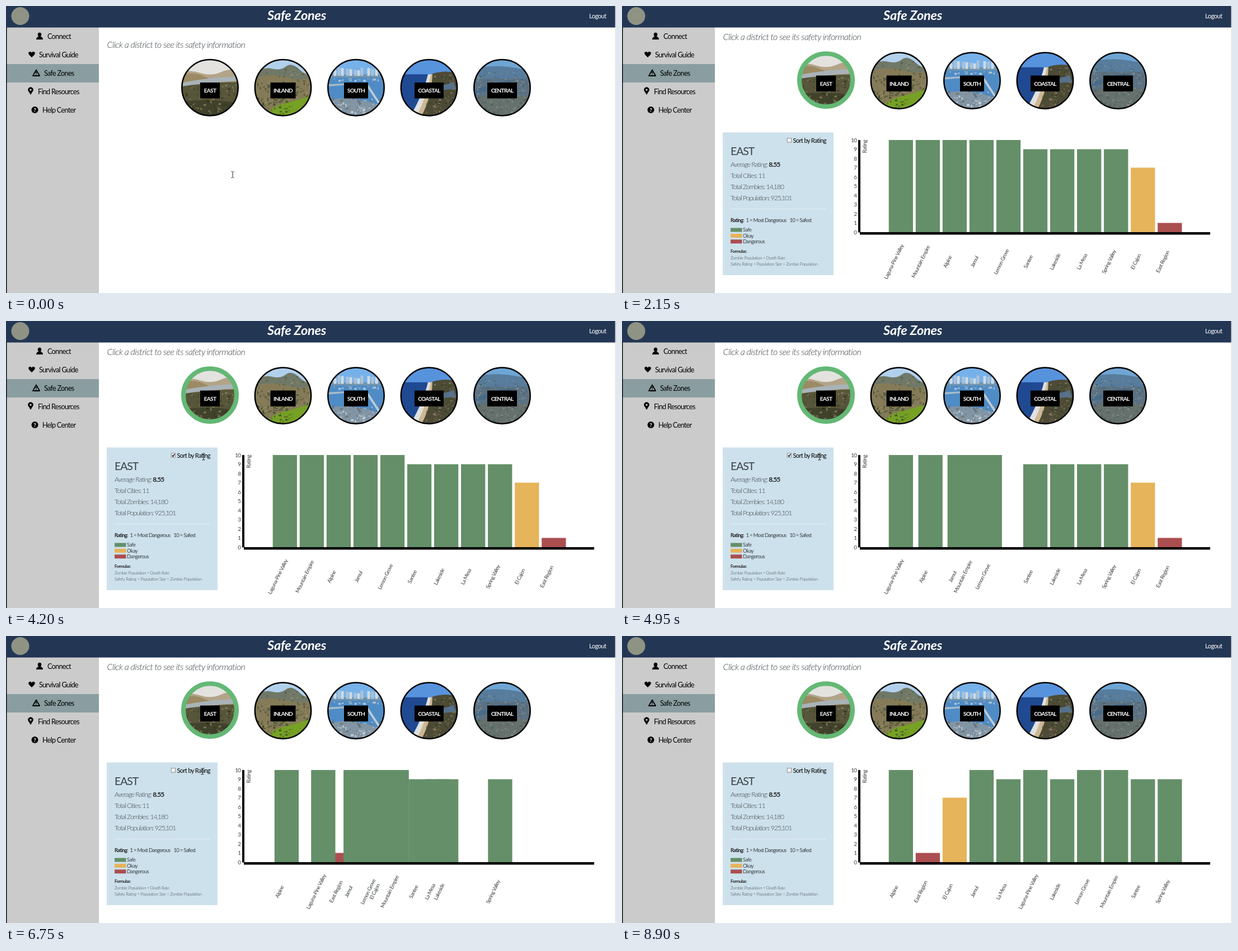
These frames come from a looping animation (1090 px wide and 514 px high, 9750 ms). An HTML page:

```html
<!DOCTYPE html>
<html lang="en">
<head>
<meta charset="utf-8">
<title>Safe Zones</title>
<style>
html, body { margin: 0; width: 100%; height: 100%; overflow: hidden; background: #fff; }
svg { display: block; width: 1090px; height: 514px; }
text { font-family: Lato, "Open Sans", sans-serif; letter-spacing: -.055em; fill: #3a4045; white-space: pre; }
.bold { font-weight: 700; fill: #222; }
.thin { font-weight: 300; letter-spacing: -.04em; }
.wide { letter-spacing: -.01em; }
.tight { letter-spacing: -.08em; }
.dark { fill: #000; }
.light { fill: #fff; }
.mid { text-anchor: middle; }
.end { text-anchor: end; }
</style>
</head>
<body>
<svg id="stage" viewBox="0 0 1090 514"></svg>
<script>
const LOOP = 9750, CLICK = 1950, LOADED = 2000, SCROLL = 14;
const CHECK_ON = 4200, CHECK_OFF = 6050;
const GREEN = '#648f68', AMBER = '#e6b45a', RED = '#ab4e50';

const text = (x, y, size, str, cls = '', more = '') =>
  `<text x="${x}" y="${y}" font-size="${size}" class="${cls}" ${more}>${str}</text>`;
const rect = (x, y, w, h, fill, more = '') =>
  `<rect x="${x}" y="${y}" width="${w}" height="${h}" fill="${fill}" ${more}/>`;
const path = (d, fill, more = '') => `<path d="${d}" fill="${fill}" ${more}/>`;

let seed = 7;
const rand = () => (seed = seed * 16807 % 2147483647) / 2147483647;

// Small random blocks that stand for houses, trees and boats
function scatter(n, x, y, w, h, colors) {
  let out = '';
  for (let i = 0; i < n; i++) {
    const c = colors[Math.floor(rand() * colors.length)];
    out += rect((x + rand() * w).toFixed(1), (y + rand() * h).toFixed(1),
      (1 + rand() * 4).toFixed(1), (1 + rand() * 2.5).toFixed(1), c);
  }
  return `<g opacity=".75">${out}</g>`;
}
const ground = fill => rect(-52, -52, 104, 104, fill);

// Circle pictures, drawn around their centre
const scenes = {
  EAST: ground('#e3e2df') +
    path('M-52-28Q-34-32-16-26T20-28T52-30V10H-52Z', '#b3a488') +
    path('M-52-22Q-30-30-8-19T52-20V12H-52Z', '#9c8a64') +
    path('M-52-8Q-10-18 52-20V-12Q0-10-52 0Z', '#a9b3b8') +
    path('M-52-2Q0-10 52-10V52H-52Z', '#57553a') +
    path('M-52 26Q0 18 52 28V52H-52Z', '#41422b') +
    scatter(130, -52, -6, 104, 58, ['#33391f', '#3f4526', '#7d7550', '#8d8364', '#2c3019']),
  INLAND: ground('#b2d0ec') +
    path('M-52-26Q-35-38-20-34T5-38T30-32T52-28V52H-52Z', '#707868') +
    path('M-52-18Q-20-26 10-18T52-20V52H-52Z', '#857b58') +
    scatter(110, -52, -34, 104, 62, ['#48553a', '#59603f', '#9a8e68', '#3a482c']) +
    path('M-30 52Q-22 34 0 29T52 14V52Z', '#76a124') +
    scatter(50, -52, 18, 58, 30, ['#314023', '#3d4b2a', '#55642f']) +
    scatter(14, 0, 30, 45, 16, ['#5b8420']),
  SOUTH: ground('#76b1ea') +
    path('M-52-24H52V-14H-52Z', '#6f93ad') +
    [-40, -33, -27, -18, -12, -4, 2, 8, 20, 27, 34].map((x, i) =>
      rect(x, -31 - i * 5 % 6, 5, 10 + i * 5 % 6, i % 2 ? '#a9c2d6' : '#cbdbe6')).join('') +
    path('M-52-18H52V52H-52Z', '#4f8cc6') +
    scatter(26, -48, -18, 96, 5, ['#d4dfe6', '#8fa9ba']) +
    path('M-52-6L10-9L10-7L-52-2Z', '#a5bccb') +
    path('M22-5L46 32L43 34L18-4Z', '#bfccd4') +
    path('M-52 22Q0 12 52 36V52H-52Z', '#8195a5') +
    scatter(110, -52, 17, 104, 35, ['#dde2e6', '#5d6b77', '#b5bfc6', '#716a62']),
  COASTAL: ground('#5793dd') +
    path('M-52-24H10V52H-52Z', '#1f4a92') +
    path('M-2-24Q-10 10-34 52H52V-24Z', '#dfe1df') +
    path('M3-24Q-3 14-23 52H52V-24Z', '#cdb894') +
    path('M6-25Q28-32 52-26V52H-14Q5 16 6-25Z', '#4d4b36') +
    scatter(120, 8, -24, 44, 76, ['#2d3822', '#3c4a28', '#7c6850', '#998c78']) +
    scatter(20, -8, 26, 24, 26, ['#7d6650', '#3c4a28']) +
    path('M24-4L44-10L48 2L26 4Z', '#55718c'),
  CENTRAL: ground('#6ea5d4') +
    path('M-52-34Q-10-42 20-36T52-34V52H-52Z', '#577c9c') +
    path('M-52-16H52V52H-52Z', '#5c7182') +
    path('M-52 18Q0 10 52 16V52H-52Z', '#66706c') +
    path('M-52 6L-10-10L30-14L-8-4L-52 14Z', '#476c8b') +
    scatter(190, -52, -30, 104, 82, ['#7f919c', '#4c5e69', '#8d988f', '#49615b', '#6e828f'])
};
const labelWidths = [35, 45, 43, 52, 53];

const districts = Object.keys(scenes).map((name, i) => {
  const w = labelWidths[i];
  return `<g transform="translate(${364.5 + 130.5 * i} 146.2)"><g class="district">
    <g class="photo"><g clip-path="url(#disc)">${scenes[name]}</g>
    <circle class="ring" r="50.2" fill="none" stroke="#000" stroke-width="2.5"/></g>
    ${rect(-w / 2, -9.2, w, 28.5, '#000', 'class="tag"')}
    ${text(0, 9, 10.2, name, 'bold light mid tight tagText')}</g></g>`;
}).join('');

const menu = [
  ['Connect', 74, path('M54 60Q54 56 58 55Q56 52 57 49Q60 46 63 49Q64 52 62 55Q66 56 66 60Z', '#000')],
  ['Survival Guide', 59, path('M46 92L41 87Q39 83 42 82Q45 81 46 84Q47 81 50 82Q53 83 51 87Z', '#000')],
  ['Safe Zones', 68, path('M54 114.5L60 125H48Z', 'none', 'stroke="#000" stroke-width="1.8" stroke-linejoin="round"') +
    path('M53.2 118h1.6v3h-1.6zM53.2 122h1.6v1.4h-1.6z', '#000')],
  ['Find Resources', 57, path('M44 159L40 152.5A4.7 4.7 0 1 1 48 152.5ZM44 148.4a1.7 1.7 0 1 0 .01 0Z', '#000', 'fill-rule="evenodd"')],
  ['Help Center', 65, '<circle cx="51.5" cy="186" r="6"/>' + text(51.3, 189.6, 10, '?', 'bold light mid')]
].map(([name, x, icon], i) => icon + text(x, 59.2 + 33 * i, 12.6, name, 'dark')).join('');

const legend = [['Safe', GREEN], ['Okay', AMBER], ['Dangerous', RED]].map(([name, c], i) =>
  rect(194, 295.5 + 10.4 * i, 20.5, 7, c) + text(216, 302.4 + 10.4 * i, 9.2, name)).join('');

const stats = [['Average Rating: ', '<tspan class="bold">8.55</tspan>'], ['Total Cities: ', 11],
  ['Total Zombies: ', '14,180'], ['Total Population: ', '925,101']].map(([key, value], i) =>
  text(194, 302 + 20 * i, 12, key + value, 'thin tight')).join('');

const ticks = Array.from({length: 11}, (_, i) =>
  text(419.5, 408.7 - 16.5 * i, 9.8, i, 'end')).join('');

document.getElementById('stage').innerHTML = `
  <clipPath id="disc"><circle r="50.5"/></clipPath>
  ${rect(0, 0, 1090, 514, '#fff')}
  <g id="page">
    ${text(180.5, 75, 16, 'Click a district to see its safety information', 'thin', 'font-style="italic"')}
    ${districts}
    <g id="panel">
      ${rect(180, 240.5, 198, 139.5, '#cde1ec', 'id="card"')}
      ${rect(295.2, 250.8, 7.4, 7.4, '#f4f4f4', 'stroke="#8f8f8f" stroke-width="1"')}
      ${path('M296.8 254.5L298.4 256.6L301.4 252.2', 'none', 'id="tick" stroke="#222" stroke-width="1.5"')}
      ${text(305.5, 259.2, 11, 'Sort by Rating', 'dark')}
      <g id="stats">${text(194, 280.5, 19.4, 'EAST')}${stats}</g>
      <g id="notes">
        ${rect(194, 261, 170, 1, '#e4eff5')}
        ${text(194, 285.3, 9.2, 'Rating:', 'bold tight')}
        ${text(221.5, 285.3, 9.6, '1 = Most Dangerous', 'tight')}
        ${text(299.5, 285.3, 9.6, '10 = Safest', 'tight')}
        ${legend}
        ${text(194, 340.3, 7.5, 'Formulas:', 'bold')}
        ${text(194, 351.7, 7.6, 'Zombie Population = Death Rate', 'thin')}
        ${text(194, 363.2, 7.6, 'Safety Rating = Population Size ÷ Zombie Population', 'thin')}
      </g>
    </g>
  </g>
  <g id="chart">
    <g id="bars"></g>
    ${rect(422, 240, 4, 165.5, '#000')}${rect(425, 405, 626, 4.5, '#000')}
    ${ticks}
    ${text(0, 0, 9.6, 'Rating', 'end', 'transform="translate(437 240) rotate(-90)"')}
  </g>
  ${rect(0, 38, 166, 476, '#cbcbcb')}
  ${rect(0, 104, 166, 33, '#8a9ea1')}
  ${menu}
  ${rect(0, 0, 1090, 38.5, '#233754')}
  <circle cx="25.5" cy="18" r="16" fill="#8e9384"/>
  ${text(467, 25, 23.6, 'Safe Zones', 'bold light wide', 'font-style="italic"')}
  ${text(1042, 22, 11.2, 'Logout', 'light')}
  ${rect(0, 38, 1.5, 476, '#111')}
  ${rect(1088.5, 0, 1.5, 514, '#e3e3e3')}
  ${path('M-2.5-5.5H-1L0-4.5L1-5.5H2.5M0-4.5V4.5M-2.5 5.5H-1L0 4.5L1 5.5H2.5', 'none', 'id="cursor" stroke="#222" stroke-width="1"')}`;

const $ = id => document.getElementById(id);
const show = (id, on) => $(id).setAttribute('display', on ? 'inline' : 'none');
const all = [...document.querySelectorAll('.district')];
const [eastPhoto, eastRing, eastTag, eastText] =
  ['.photo', '.ring', '.tag', '.tagText'].map(s => all[0].querySelector(s));

const cities = [['Laguna-Pine Valley', 10], ['Mountain Empire', 10], ['Alpine', 10], ['Jamul', 10],
  ['Lemon Grove', 10], ['Santee', 9], ['Lakeside', 9], ['La Mesa', 9], ['Spring Valley', 9],
  ['El Cajon', 7], ['East Region', 1]];
const byRating = [0, 2, 3, 4, 1, 5, 6, 7, 8, 9, 10].map(i => cities[i]);
const byName = [...cities].sort((a, b) => a[0] < b[0] ? -1 : 1);
const sorts = [[-1e4, cities, cities], [4370, cities, byRating], [6190, byRating, byName]];

const clamp = u => Math.max(0, Math.min(1, u));
const cubic = u => u < .5 ? 4 * u ** 3 : 1 - 4 * (1 - u) ** 3;
const slotX = i => 476.7 + 48.05 * i;

// Each bar starts 50 ms after the one before it and travels for 750 ms
function drawBars(t) {
  const [start, from, to] = sorts.filter(s => t >= s[0]).pop();
  $('bars').innerHTML = to.map((city, i) => {
    const [name, rating] = city, a = slotX(from.indexOf(city));
    const x = a + (slotX(i) - a) * cubic(clamp((t - start - 50 * i) / 750));
    const color = rating > 7 ? GREEN : rating > 3 ? AMBER : RED;
    return rect(x, 405 - 16.5 * rating, 43.3, 16.5 * rating, color) +
      text(0, 3.2, 9.4, name, 'mid', `transform="translate(${x + 9} 458) rotate(-64)"`);
  }).join('');
}

const route = [[0, 405, 302], [600, 405, 302], [1500, 362, 151], [1950, 362, 151], [2400, 354, 185.5],
  [2900, 556, 292], [3750, 353, 243.5], [5000, 353, 243.5], [5100, 351, 242.5], [8250, 351, 242.5],
  [8600, 931, 461], [8800, 931, 461], [8900, 1084, 524], [LOOP, 1084, 524]];

function cursorAt(t) {
  const i = route.findIndex(p => t < p[0]);
  const [t0, x0, y0] = route[i - 1], [t1, x1, y1] = route[i];
  const u = (t - t0) / (t1 - t0), s = u * u * (3 - 2 * u);
  return [x0 + (x1 - x0) * s, y0 + (y1 - y0) * s];
}

function draw(t) {
  const clicked = t >= CLICK, loaded = t >= LOADED, scroll = loaded ? SCROLL : 0;
  const [x, y] = cursorAt(t);
  const pageY = y + scroll;
  const hover = Math.abs(x - 364.5) < 17.5 && pageY > 137 && pageY < 167;

  $('page').setAttribute('transform', `translate(0 ${-scroll})`);
  all.forEach(g => g.setAttribute('transform', `translate(0 ${clicked ? 1.5 : 0})`));
  eastPhoto.setAttribute('transform', `translate(0 ${clicked ? -1 : 0})`);
  eastRing.setAttribute('stroke', clicked ? '#64b875' : '#000');
  eastRing.setAttribute('stroke-width', clicked ? 8 : 2.5);
  eastRing.setAttribute('r', clicked ? 47.5 : 50.2);
  eastTag.setAttribute('fill', hover ? '#fff' : '#000');
  eastText.style.fill = hover ? '#000' : '#fff';

  show('panel', clicked);
  show('stats', loaded);
  show('chart', loaded);
  show('tick', t >= CHECK_ON && t < CHECK_OFF);
  $('card').setAttribute('height', loaded ? 255.5 : 139.5);
  $('notes').setAttribute('transform', `translate(0 ${loaded ? 116 : 0})`);
  if (loaded) drawBars(t);

  show('cursor', t < 8900 && Math.hypot(x - 364.5, pageY - 146.5) > 52);
  $('cursor').setAttribute('transform', `translate(${x} ${y})`);
}

const begin = performance.now();
function frame() {
  draw((performance.now() - begin) % LOOP);
  requestAnimationFrame(frame);
}
frame();
</script>
</body>
</html>
```
